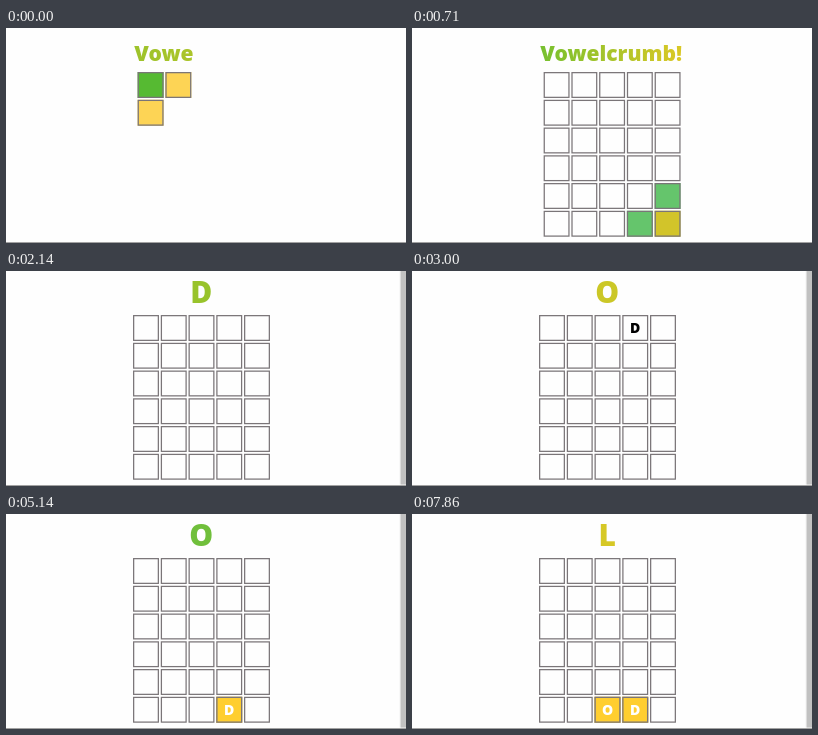
An HTML page with a canvas for the animation above (8000 ms loop, 400 px wide and 215 px high).

```html
<!DOCTYPE html>
<html lang="en">
<head>
<meta charset="utf-8">
<title>Falling letters</title>
<style>
html, body { margin: 0; width: 100%; height: 100%; overflow: hidden; background: #fefefe; }
canvas { display: block; width: 400px; height: 215px; }
</style>
</head>
<body>
<canvas id="stage"></canvas>
<script>
const W = 400, H = 215, LOOP = 8000;
const TITLE = 'Vowelcrumb!';
const ROWS = 6, COLS = 5, CELL = 26, PITCH = 27.75;
const LANDED = '#ffce2f';
const GAME_START = 1280, WAVE_STEP = 86, LETTER_STEP = 90;

// Colour ramps as [position, rgb] stops.
const WAVE = [
  [0, [255, 213, 87]], [0.25, [213, 196, 42]], [1, [85, 185, 47]],
  [1.25, [97, 196, 105]], [2, [254, 254, 254]]
];
const GLOW = [[0, [92, 190, 92]], [0.28, [120, 192, 46]], [1, [219, 200, 38]]];

const canvas = document.getElementById('stage');
const ctx = canvas.getContext('2d');
const scale = window.devicePixelRatio || 1;
canvas.width = W * scale;
canvas.height = H * scale;

// Each move is [time, row, column].
const pieces = [
  { letter: 'D', lands: 4650, moves: [
    [2350, 0, 2], [2700, 0, 3], [3150, 1, 3], [3290, 2, 3], [3430, 3, 3],
    [3700, 3, 4], [4100, 4, 4], [4250, 4, 3], [4500, 5, 3]] },
  { letter: 'O', lands: 7720, moves: [
    [5250, 0, 2], [6400, 0, 3], [6550, 0, 4], [6700, 1, 4], [6950, 1, 3],
    [7080, 1, 2], [7200, 2, 2], [7330, 3, 2], [7450, 4, 2], [7580, 5, 2]] }
];
const upcoming = [
  { letter: 'D', from: 1300, fade: 500 },
  { letter: 'O', from: 2350, fade: 250 },
  { letter: 'L', from: 5250, fade: 250 }
];

const clamp = v => Math.min(1, Math.max(0, v));
const font = size => `800 ${size}px "Open Sans", sans-serif`;
const latest = (list, test) => list.filter(test).pop();

function ramp(stops, at) {
  const next = Math.max(1, stops.findIndex(s => s[0] > at));
  const i = at >= stops[stops.length - 1][0] ? stops.length - 1 : next;
  const [p, a] = stops[i - 1], [q, b] = stops[i];
  const k = clamp((at - p) / (q - p));
  return `rgb(${a.map((v, c) => Math.round(v + (b[c] - v) * k))})`;
}

function drawText(text, x, y, size, fill, align) {
  ctx.font = font(size);
  ctx.textAlign = align;
  ctx.fillStyle = fill;
  ctx.fillText(text, x, y);
}

function drawCell(row, col, left, fill) {
  const x = left + col * PITCH, y = 44 + row * PITCH;
  ctx.fillStyle = fill;
  ctx.fillRect(x, y, CELL, CELL);
  ctx.strokeStyle = '#7a7578';
  ctx.lineWidth = 1.25;
  ctx.strokeRect(x + 0.65, y + 0.65, CELL - 1.3, CELL - 1.3);
}

function drawGrid(t, left) {
  for (let row = 0; row < ROWS; row++) {
    for (let col = 0; col < COLS; col++) {
      const age = t / WAVE_STEP + 1 - row - col;
      if (age >= 0) drawCell(row, col, left, ramp(WAVE, age));
    }
  }
}

function drawTitle(t, x) {
  const alpha = 1 - clamp((t - 1400) / 300);
  if (!alpha) return;
  const s = t / 1000;
  const start = 0.55 - 0.4 * s;
  const slope = Math.min(0.78, 0.25 + 0.7 * s);
  const fill = ctx.createLinearGradient(x, 0, x + 143, 0);
  for (let i = 0; i <= 8; i++) {
    fill.addColorStop(i / 8, ramp(GLOW, start + slope * i / 8));
  }
  ctx.globalAlpha = alpha;
  drawText(TITLE.slice(0, 4 + Math.floor(t / LETTER_STEP)), x, 33, 21, fill, 'left');
  ctx.globalAlpha = 1;
}

function drawUpcoming(t) {
  const next = latest(upcoming, u => t >= u.from);
  if (!next) return;
  const phase = (((t - 950) / 2330) % 2 + 2) % 2;
  const glow = 1 - Math.abs(1 - phase);
  ctx.globalAlpha = clamp((t - next.from) / next.fade);
  drawText(next.letter, 195.3, 32, 30, ramp(GLOW, glow), 'center');
  ctx.globalAlpha = 1;
}

function drawPiece(piece, t, left) {
  const move = latest(piece.moves, m => t >= m[0]);
  if (!move) return;
  const [, row, col] = move;
  const landed = t >= piece.lands;
  if (landed) drawCell(row, col, left, LANDED);
  drawText(piece.letter, left + col * PITCH + CELL / 2, 62.2 + row * PITCH, 14,
    landed ? '#fff' : '#000', 'center');
}

function drawScrollbar() {
  ctx.fillStyle = '#f1f1f1';
  ctx.fillRect(393.5, 0, 6.5, 213.5);
  ctx.fillStyle = '#c1c1c1';
  ctx.fillRect(394.6, 0, 5.4, 213.5);
}

function draw(t) {
  const playing = t >= GAME_START;
  const shift = playing ? 4.6 : 0;
  const left = 131.6 - shift;
  ctx.setTransform(scale, 0, 0, scale, 0, 0);
  ctx.fillStyle = '#fefefe';
  ctx.fillRect(0, 0, W, H);
  drawGrid(t, left);
  drawUpcoming(t);
  drawTitle(t, 128.3 - shift);
  pieces.forEach(p => drawPiece(p, t, left));
  if (playing) drawScrollbar();
  ctx.fillStyle = '#a2a2a2';
  ctx.fillRect(0, 214, W, 1);
}

const begin = performance.now();
function tick() {
  draw((performance.now() - begin) % LOOP);
  requestAnimationFrame(tick);
}
tick();
</script>
</body>
</html>
```
